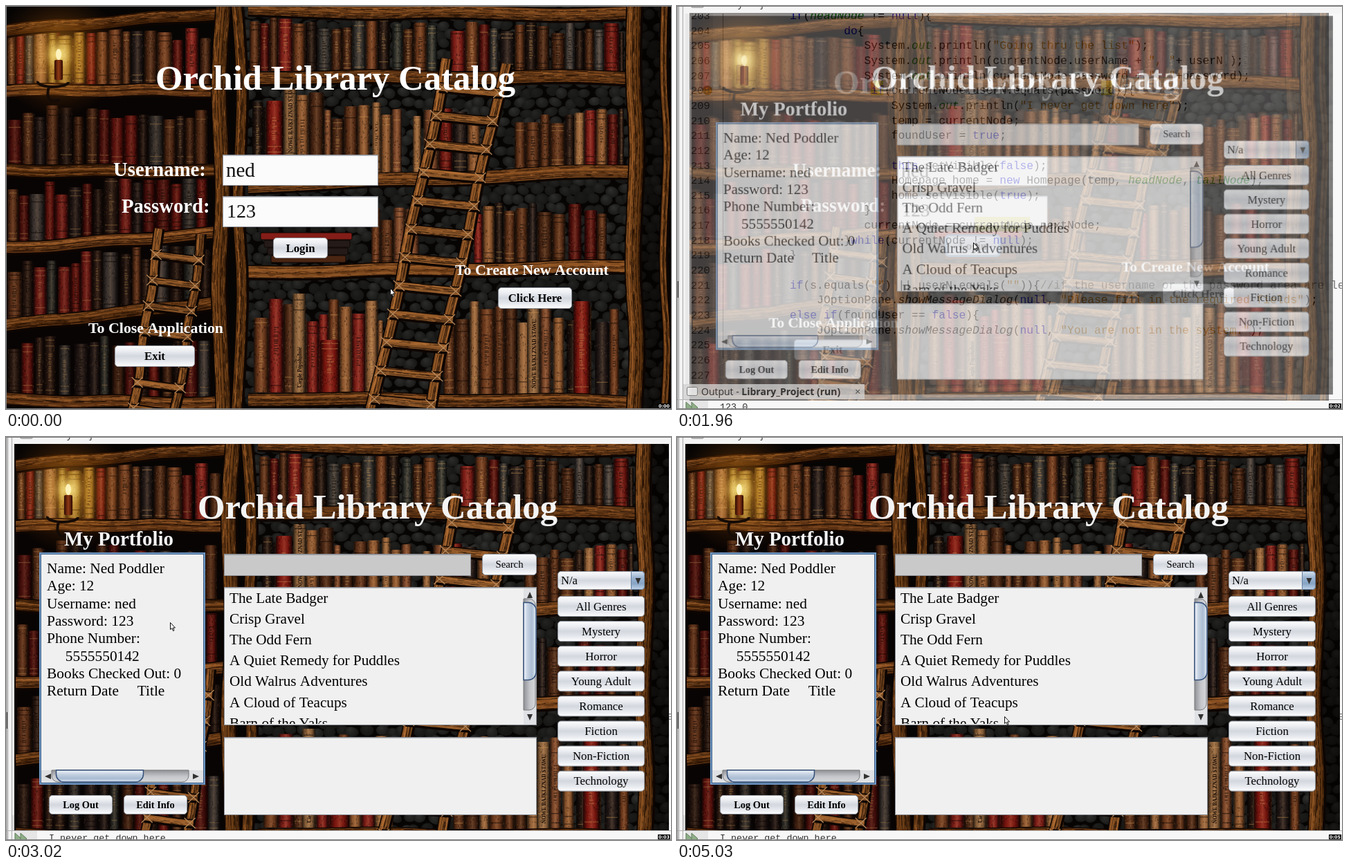
An HTML page with a canvas that plays this animation: 961x583 px, repeating every 5.13 s.

```html
<!DOCTYPE html>
<html lang="en">
<head>
<meta charset="utf-8">
<title>Library catalog</title>
<style>
html, body { margin: 0; width: 100%; height: 100%; overflow: hidden; background: #111; }
canvas { display: block; }
</style>
</head>
<body>
<canvas id="stage" width="961" height="583"></canvas>
<script>
const W = 961, H = 583, LOOP = 5130;
const SERIF = '"Liberation Serif", "Times New Roman", serif';
const MONO = '"Liberation Mono", monospace';
const SANS = '"Open Sans", sans-serif';
const stage = document.getElementById('stage').getContext('2d');
let g = stage;

let seed = 41;
function rnd() {
  seed = (seed + 0x6D2B79F5) | 0;
  let t = Math.imul(seed ^ (seed >>> 15), 1 | seed);
  t = (t + Math.imul(t ^ (t >>> 7), 61 | t)) ^ t;
  return ((t ^ (t >>> 14)) >>> 0) / 4294967296;
}
const range = (a, b) => a + rnd() * (b - a);
const pick = list => list[Math.floor(rnd() * list.length)];
const lerp = (a, b, f) => a + (b - a) * f;

function layer(draw) {
  const c = document.createElement('canvas');
  c.width = W; c.height = H;
  g = c.getContext('2d');
  draw();
  g = stage;
  return c;
}

function rect(x, y, w, h, fill) { g.fillStyle = fill; g.fillRect(x, y, w, h); }

function text(s, x, y, size, color = '#000', style = '', align = 'left', family = SERIF) {
  g.font = `${style} ${size}px ${family}`;
  g.textAlign = align;
  g.fillStyle = color;
  g.fillText(s, x, y);
}

function poly(points, fill, line) {
  g.beginPath();
  points.forEach(([x, y]) => g.lineTo(x, y));
  g.closePath();
  g.fillStyle = fill;
  g.fill();
  if (line) { g.strokeStyle = line; g.lineWidth = 1; g.stroke(); }
}

function blend(x0, y0, x1, y1, colors) {
  const gr = g.createLinearGradient(x0, y0, x1, y1);
  colors.forEach((c, i) => gr.addColorStop(i / (colors.length - 1), c));
  return gr;
}

function rounded(x, y, w, h, r, fill, line, lw = 1) {
  g.beginPath();
  g.roundRect(x, y, w, h, r);
  g.fillStyle = fill;
  g.fill();
  if (line) { g.strokeStyle = line; g.lineWidth = lw; g.stroke(); }
}

/* ---------- wallpaper ---------- */

const INK = {
  r: ['#74150f', '#841d17', '#58100c'], b: ['#5e3017', '#4a2512', '#713a1c'],
  t: ['#93592f', '#82492a', '#9d673b'], g: ['#3b3733', '#47403c', '#343630'],
  k: ['#20130e', '#2c1a12', '#241a18'], o: ['#9c661f', '#8d6422']
};

function book(x, w, top, bottom, color) {
  const h = bottom - top;
  rounded(x, top, w, h, [3, 3, 0, 0], color);
  g.fillStyle = blend(x, 0, x + w, 0,
    ['rgba(0,0,0,.75)', 'rgba(0,0,0,.1)', 'rgba(255,205,150,.16)', 'rgba(0,0,0,.15)', 'rgba(0,0,0,.85)']);
  g.fill();
  const gold = rnd() < .5 ? 'rgba(215,165,90,.36)' : 'rgba(10,4,0,.55)';
  for (const f of [.06, .16, .82, .92]) if (rnd() < .6) rect(x + 2, top + h * f, w - 4, 1.3, gold);
  if (rnd() < .5) {
    const end = top + h * range(.55, .78);
    for (let y = top + h * .3; y < end; y += range(2, 5)) rect(x + w * .35, y, w * range(.15, .35), 1.4, gold);
  }
  for (let i = 0; i < w * h / 20; i++)
    rect(x + rnd() * w, top + rnd() * h, 1, range(1, 3), rnd() < .6 ? 'rgba(0,0,0,.4)' : 'rgba(230,165,110,.16)');
}

// books standing on a floor that may slope
function row(x0, x1, floor, tall, mix) {
  for (let x = x0; x < x1 - 6;) {
    const w = Math.min(range(12, 22), x1 - x), y = floor(x);
    book(x, w, y - tall * range(.74, 1), y, pick(INK[pick(mix)]));
    x += w + (rnd() < .15 ? range(2, 6) : .5);
  }
}

function titled(label, x, w, top, bottom, color) {
  book(x, w, top, bottom, color);
  g.save();
  g.translate(x + w / 2 + 3, bottom - 8);
  g.rotate(-Math.PI / 2);
  text(label, 0, 0, 7.5, '#1b0d06', 'bold');
  g.restore();
}

function curve(points, dx, dy) {
  g.beginPath();
  g.moveTo(points[0][0] + dx, points[0][1] + dy);
  for (let i = 1; i < points.length; i++) {
    const [x, y] = points[i], [nx, ny] = points[i + 1] || points[i];
    g.quadraticCurveTo(x + dx, y + dy, (x + nx) / 2 + dx, (y + ny) / 2 + dy);
  }
}

function beam(points, w, base) {
  const a = points[0], b = points[points.length - 1];
  const upright = Math.abs(b[1] - a[1]) > Math.abs(b[0] - a[0]);
  const line = (color, lw, o) => {
    curve(points, upright ? o : 0, upright ? 0 : o);
    g.strokeStyle = color; g.lineWidth = lw; g.stroke();
  };
  line('#0d0502', w + 5, 1);
  line(base, w, 0);
  line('rgba(176,104,46,.45)', w * .3, -w * .25);
  for (let i = 0; i < w * 1.3; i++) {
    g.setLineDash([range(4, 40), range(4, 30)]);
    g.lineDashOffset = range(0, 60);
    line(rnd() < .58 ? 'rgba(20,8,2,.5)' : 'rgba(205,130,66,.32)', 1, range(-w / 2, w / 2));
  }
  g.setLineDash([]);
}

function wavy(x0, y0, x1, y1, dx, dy) {
  return Array.from({ length: 7 }, (_, i) => {
    const s = Math.sin(i * 2.1 + x0 + y0);
    return [lerp(x0, x1, i / 6) + dx * s, lerp(y0, y1, i / 6) + dy * s];
  });
}

// rails lean by `lean` pixels from top to bottom
function ladder(x, y, span, lean, gap, w) {
  const at = py => x + lean * (py - y) / (H - y);
  beam(wavy(x, y, at(H), H, 3, 0), w, '#7c4a20');
  beam(wavy(x + span, y + 8, at(H) + span, H, 3, 0), w, '#7c4a20');
  for (let ry = y + gap; ry < H; ry += gap) {
    const a = at(ry), b = a + span;
    beam([[a - 4, ry], [(a + b) / 2, ry + 5], [b + 5, ry + 9]], w * .8, '#855226');
    g.strokeStyle = '#b5875a';
    g.lineWidth = 1.3;
    g.beginPath();
    for (const [kx, ky] of [[a, ry], [b, ry + 8]]) {
      g.moveTo(kx - 8, ky - 7); g.lineTo(kx + 8, ky + 8);
      g.moveTo(kx + 8, ky - 7); g.lineTo(kx - 8, ky + 8);
    }
    g.stroke();
  }
}

function stones(x0, x1) {
  for (let y = 0; y < H + 10; y += 14) for (let x = x0; x < x1; x += 18) {
    const cx = x + range(-5, 5) + (y / 14 % 2) * 9, cy = y + range(-3, 3), s = Math.round(range(26, 46));
    const gr = g.createRadialGradient(cx - 2, cy - 3, 1, cx, cy, 11);
    gr.addColorStop(0, `rgb(${s},${s},${s - 2})`);
    gr.addColorStop(1, '#141413');
    g.fillStyle = gr;
    g.beginPath();
    g.ellipse(cx, cy, range(8, 11), range(6, 8.5), range(-.5, .5), 0, 7);
    g.fill();
  }
}

function candle(x, y) {
  const glow = g.createRadialGradient(x, y, 2, x, y, 90);
  ['rgba(255,225,120,.95)', 'rgba(215,130,25,.45)', 'rgba(170,85,10,.22)', 'rgba(120,50,0,0)']
    .forEach((c, i) => glow.addColorStop((i / 3) ** 1.3, c));
  g.globalCompositeOperation = 'screen';
  rect(0, 0, 180, 175, glow);
  g.globalCompositeOperation = 'source-over';
  g.strokeStyle = '#150b06';
  g.lineWidth = 4;
  g.beginPath();
  g.ellipse(x - 8, y + 40, 22, 7, 0, 0, 3.3);
  g.moveTo(x - 14, y + 46);
  g.quadraticCurveTo(x - 21, y + 73, x + 2, y + 66);
  g.stroke();
  rounded(x - 6, y + 8, 12, 29, 2, blend(x - 6, 0, x + 6, 0, ['#2c0a03', '#8f3a14', '#2c0a03']));
  g.fillStyle = '#fff3bd';
  g.beginPath();
  g.ellipse(x, y, 4, 8, 0, 0, 7);
  g.fill();
}

// shelf heights at the two ends of each bay
const LEFT = [[34, 10], [122, 122], [238, 239], [351, 328], [462, 428], [570, 575]];
const RIGHT = [[6, 12], [103, 103], [260, 238], [385, 377], [568, 572]];
// groups of books per right-hand shelf: start, end, height
const GROUPS = [
  [[352, 626, 80], [642, 893, 72]],
  [[356, 470, 128], [470, 572, 108], [588, 690, 98], [735, 893, 84]],
  [[528, 600, 82], [676, 868, 88]],
  [[358, 545, 138], [632, 893, 134]]
];

function wallpaper() {
  rect(0, 0, W, H, '#070504');
  stones(345, 950);
  rect(905, 0, 56, H, 'rgba(5,2,0,.5)');

  for (const [a, b] of LEFT.slice(1)) row(2, 296, x => lerp(a, b, x / 300) - 9, 86, 'rrkkbbg');
  rect(0, 134, 300, 449, 'rgba(10,2,0,.2)');
  row(40, 118, () => 111, 86, 'oot');

  GROUPS.forEach((groups, i) => {
    const [a, b] = RIGHT[i + 1];
    const floor = x => lerp(a, b, (x - 350) / 550) - 9;
    for (const [x0, x1, tall] of groups) row(x0, x1, floor, tall, i ? 'ttbbrk' : 'gkbbr');
  });
  for (let i = 0; i < 4; i++) rounded(368 + i * 5, 328 + i * 11, 132 - i * 8, 10, 2, pick(INK[pick('krbt')]), '#100703');
  const red = '#84160f', tan = '#95683f';
  book(376, 24, 137, 217, red);
  book(454, 28, 483, 559, red);
  book(820, 24, 427, 561, red);
  titled('NOWE BAJKI ZNAD STAWU', 401, 19, 120, 220, tan);
  titled('NOWE BAJKI ZNAD STAWU', 753, 19, 435, 561, tan);
  titled('Ciepłe Popołudnie', 414, 19, 416, 560, tan);

  LEFT.forEach(([a, b], i) => beam(wavy(0, a, 312, b, 0, 2.5), 16, i % 2 ? '#5c3112' : '#482409'));
  for (const [a, b] of RIGHT) beam(wavy(350, a, 900, b, 0, 3), 17, '#653815');
  for (const [x, w] of [[310, 20], [338, 14], [908, 20], [952, 9]]) beam(wavy(x, 0, x, H, 5, 0), w, '#57300f');

  ladder(222, 322, 62, -38, 37, 11);
  ladder(639, 76, 82, -110, 41, 13);
  candle(76, 70);
}

/* ---------- widgets ---------- */

const PLAIN = ['#ffffff', '#eceef2', '#d3d7de', '#e6e9ee', '#ffffff'];
const HOVER = ['#ffffff', '#f4f6fa', '#e0e4ec', '#f0f3f8', '#ffffff'];
const DOWN = ['#c3c7d4', '#b0b6c6', '#a0a7b8', '#b8bfce', '#d2d8e4'];
const BLUE = ['#dbe6f2', '#9db5d0', '#86a3c4', '#c3d6ea'];
const TRACK = ['#8f9196', '#c4c6ca', '#d8dadd'];
const THUMB = ['#f2f6fb', '#c3d0e0', '#a9bbd2', '#e2ecf6'];

function button(label, x, y, w, h, size, style = '', tones = PLAIN, focus = false) {
  if (focus) rounded(x - 2, y - 1.5, w + 4, h + 3, 6, '#6d9fd0', '#34608f');
  rounded(x + .5, y + .5, w - 1, h - 1, 4.5, blend(0, y, 0, y + h, tones), focus ? '#3d4a63' : '#8d929b');
  text(label, x + w / 2, y + h / 2 + size * .33, size, '#000', style, 'center');
}

function field(x, y, w, h, fill) {
  rect(x, y, w, h, '#8e9198');
  rect(x + 1, y + 1, w - 2, h - 2, fill);
  rect(x + 1, y + 1, w - 2, 1, 'rgba(90,95,105,.4)');
}

function arrowhead(x, y, dx, dy) {
  poly([[x + dx * 5, y + dy * 5], [x - dx * 4 + dy * 4, y - dy * 4 + dx * 4],
    [x - dx * 4 - dy * 4, y - dy * 4 - dx * 4]], '#333');
}

const TITLE = 'Orchid Library Catalog';

function login(tones, focus) {
  const label = (s, x, y, size) => text(s, x, y, size, '#fff', 'bold');
  g.drawImage(wall, 0, 0);
  label(TITLE, 216, 121, 50.7);
  label('Username:', 155, 246, 28.7);
  label('Password:', 167, 299, 28.7);
  field(313, 215, 225, 45, '#fbfbfc');
  field(313, 275, 225, 45, '#fbfbfc');
  text('ned', 318, 247, 29, '#111');
  text('123', 319, 306, 28, '#111');
  button('Login', 386, 335, 79, 30, 16.8, 'bold', tones, focus);
  label('To Create New Account', 649, 389, 21.9);
  button('Click Here', 711, 407, 107, 31, 16.8, 'bold');
  label('To Close Application', 119, 473, 21.9);
  button('Exit', 157, 491, 116, 31, 16.8, 'bold');
}

const PROFILE = ['Name: Ned Poddler', 'Age: 12', 'Username: ned', 'Password: 123', 'Phone Number:',
  '     5555550142', 'Books Checked Out: 0', 'Return Date     Title'];
const BOOKS = ['The Late Badger', 'Crisp Gravel', 'The Odd Fern', 'A Quiet Remedy for Puddles',
  'Old Walrus Adventures', 'A Cloud of Teacups', 'Barn of the Yaks'];
const GENRES = ['All Genres', 'Mystery', 'Horror', 'Young Adult', 'Romance', 'Fiction', 'Non-Fiction', 'Technology'];

function clipped(x, y, w, h, draw) {
  g.save();
  g.beginPath();
  g.rect(x, y, w, h);
  g.clip();
  draw();
  g.restore();
}

function home() {
  rect(12, 10, 946, 559, '#120a05');
  clipped(12, 10, 946, 559, () => g.drawImage(wall, 14, 6));
  text(TITLE, 277, 118, 50.7, '#f4f4f4', 'bold');
  text('My Portfolio', 84, 157, 28.9, '#f4f4f4', 'bold');

  rect(48, 167, 240, 336, '#6f98c4');
  rect(50, 169, 236, 332, '#3f5f86');
  rect(51, 170, 234, 330, '#f0f0f0');
  PROFILE.forEach((s, i) => text(s, 59, 197 + i * 25.3, 21.4));
  rect(51, 482, 234, 18, '#dfe1e4');
  rounded(66, 482, 198, 17, [0, 0, 9, 9], blend(0, 482, 0, 500, TRACK), '#777');
  rounded(72.5, 482, 126, 17, [0, 0, 11, 11], blend(0, 482, 0, 500, THUMB), '#34507a', 1.5);
  arrowhead(61, 491, -1, 0);
  arrowhead(274, 491, 1, 0);
  button('Log Out', 62, 518, 92, 28, 14.4, 'bold');
  button('Edit Info', 170, 518, 92, 28, 14.4, 'bold');

  field(315, 169, 357, 32, '#c9c9c9');
  button('Search', 688, 169, 79, 31, 14.7);
  field(315, 217, 452, 200, '#f0f0f0');
  clipped(316, 218, 432, 197, () => BOOKS.forEach((s, i) => text(s, 323, 240 + i * 30.1, 21.2)));
  rect(748, 219, 18, 197, '#dfe1e4');
  rounded(748, 234, 17, 161, [0, 9, 9, 0], blend(748, 0, 766, 0, TRACK), '#777');
  rounded(748, 239.5, 18, 112, [0, 11, 11, 0], blend(748, 0, 766, 0, THUMB), '#34507a', 1.5);
  arrowhead(757, 229, 0, -1);
  arrowhead(757, 405, 0, 1);
  field(315, 434, 452, 113, '#f0f0f0');

  button('', 797, 194, 126, 27, 16);
  rounded(903.5, 194.5, 19, 26, [0, 4, 4, 0], blend(0, 194, 0, 221, BLUE), '#66809f');
  arrowhead(913.5, 208, 0, 1);
  text('N/a', 802, 213, 16.6);
  GENRES.forEach((s, i) => button(s, 797, 230 + i * 36.1, 126, 30, 16.8));
}

/* ---------- editor behind the windows ---------- */

// one entry per line from 203 on; leading spaces indent by half a character
const CODE = `if(headNode != null){
                do{
                      System.out.println("Going thru the list");
                      System.out.println(currentNode.userName + ", "+ userN );
                      System.out.println(currentNode.password + ", "+password);
                        if(currentNode.userN.equals(password)){
                              System.out.println("I never get down here");
                              temp = currentNode;
                              foundUser = true;

                              this.setVisible(false);
                              Homepage home = new Homepage(temp, headNode, tailNode);
                              home.setVisible(true);
                      }
                      currentNode = currentNode.nextNode;
                }while(currentNode != null);
}

if(s.equals("") || userN.equals("")){//if the username or the password area are left blank
        JOptionPane.showMessageDialog(null, "Please fill in the required fields");
else if(foundUser == false){
        JOptionPane.showMessageDialog(null, "You are not in the system.");`.split('\n');
const TOKEN = /"[^"]*"|\/\/.*|\w+|\W/g;

function tint(word) {
  if (word[0] === '"') return ['#b86a00', ''];
  if (word.startsWith('//')) return ['#777', ''];
  if (/^(if|do|null|true|false|this|new|while|else)$/.test(word)) return ['#0000d0', ''];
  if (/^(headNode|tailNode|out)$/.test(word)) return ['#007a00', 'italic'];
  return ['#000', word === 'showMessageDialog' ? 'italic' : ''];
}

function editor() {
  const lineY = i => 19 + i * 21.65, cell = 9.78;
  rect(0, 0, W, H, '#f8f8f8');
  rect(0, 0, 52, 547, '#e8e8e8');
  rect(66, 10, 1, 500, '#888');
  rect(280, 108, 18, 21, '#e8e04a');
  rect(613, 108, 16, 21, '#e8e04a');
  rect(430, 305, 80, 21, '#ece89a');
  rounded(38, 116, 12, 12, 5, '#d79a20', '#6d4b10');
  for (let i = 0; i < 25; i++) text(203 + i, 20, lineY(i), 15.5, '#444', '', 'left', MONO);
  CODE.forEach((src, i) => {
    const line = src.trimStart();
    let x = 163 + (src.length - line.length) * cell / 2;
    for (const word of line.match(TOKEN) || []) {
      const [color, style] = tint(word);
      text(word, x, lineY(i), 16.3, color, style, 'left', MONO);
      x += word.length * cell;
    }
  });
  rect(0, 0, W, 11, '#f4f4f4');
  rounded(20.5, -8, 18, 10, 2, '#eee', '#777');
  text('Library Project', 50, 1, 14, '#333', '', 'left', SANS);
  rect(0, 0, 12, H, '#f2f2f2');
  rect(2, 0, 1, H, '#8a8a8a');
  rect(8, 0, 1, H, '#a8a8a8');
  rect(0, 398, 2, 24, '#555');
  outputTab();
  rect(9, 570, W, 13, '#f7f7f7');
  rect(12, 570, 33, 13, '#e6e6e6');
  rect(0, 569, W, 1, '#b5b5b5');
  for (const x of [13, 21]) poly([[x, 573], [x + 9, 581], [x, 589]], '#8fae88', '#5f7d5a');
}

function outputTab() {
  rect(9, 547, 262, 22, '#d9d9d9');
  rounded(14.5, 551.5, 15, 12, 2, '#eee', '#666');
  text('Output - ', 35, 563, 14, '#111', '', 'left', SANS);
  const x = 35 + g.measureText('Output - ').width;
  text('Library_Project (run)', x, 563, 14, '#111', 'bold', 'left', SANS);
  text('×', 257, 563, 15, '#333', '', 'left', SANS);
}

const wall = layer(wallpaper);
const loginPlain = layer(() => login(PLAIN, false));
const loginHover = layer(() => login(HOVER, false));
const loginDown = layer(() => login(DOWN, true));
const homeView = layer(home);
const editorView = layer(editor);

/* ---------- timeline ---------- */

const REST = 507, BEAT = 132;
const HOVERED = 8, PRESSED = 10, SWAP = 12;

// beat, pointer x, pointer y
const PATH = [
  [0, 555, 408], [2, 534, 324], [3, 484, 308], [5, 450, 301], [8, 430, 331], [11, 425, 338], [12, 428, 342],
  [14, 428, 342], [16, 490, 341], [17, 359, 347], [20, 237, 268], [22, 191, 460], [24, 180, 479],
  [27, 180, 479], [29, 203, 369], [31, 198, 331], [32, 198, 331], [35, 473, 404]
];

function pointerAt(beat) {
  const i = PATH.findIndex(p => p[0] >= beat);
  if (i < 1) return PATH[i ? PATH.length - 1 : 0].slice(1);
  const [b0, x0, y0] = PATH[i - 1], [b1, x1, y1] = PATH[i];
  const f = (beat - b0) / (b1 - b0);
  return [Math.round(lerp(x0, x1, f)), Math.round(lerp(y0, y1, f))];
}

function pointer(x, y, caret) {
  g.save();
  g.translate(x, y);
  if (caret) {
    rect(0, 0, 7, 1, '#222');
    rect(3, 0, 1, 12, '#222');
    rect(0, 11, 7, 1, '#222');
  } else {
    poly([[.5, .5], [.5, 10.5], [2.8, 8.6], [4.5, 12.5], [6, 11.8], [4.4, 8], [7.5, 8]], '#fff', '#111');
  }
  g.restore();
}

function show(view, alpha, scale, dx, dy) {
  g.globalAlpha = alpha;
  g.drawImage(view, dx, dy, W * scale, H * scale);
  g.globalAlpha = 1;
}

function draw(time) {
  const beat = Math.max(0, Math.floor((time - REST) / BEAT) + 1);
  if (beat < SWAP) {
    g.drawImage(beat < HOVERED ? loginPlain : beat < PRESSED ? loginHover : loginDown, 0, 0);
  } else {
    g.drawImage(editorView, 0, 0);
    text(beat === SWAP ? '123.0' : 'I never get down here', 62, 584, 13.4, '#333', '', 'left', MONO);
    if (beat === SWAP) {
      show(loginDown, .45, .962, 18, 10);
      show(homeView, .53, .98, 9, 4.5);
      g.globalAlpha = .75;
      outputTab();
      g.globalAlpha = 1;
    } else if (beat === SWAP + 1) {
      show(homeView, .95, .998, 1, 0);
    } else {
      g.drawImage(homeView, 0, 0);
    }
  }
  const [x, y] = pointerAt(beat);
  pointer(x, y, beat >= 3 && beat < SWAP);
  rect(0, 0, W, 1, '#7d7d7d');
  rect(0, 0, 1, H, '#7d7d7d');
  rect(0, 582, W, 1, '#7d7d7d');
  rect(942, 575, 18, 7, '#000');
  const clock = Math.floor((REST + (beat - 1) * BEAT + 70) / 1000);
  text('0:0' + clock, 951, 581, 6.4, '#fff', 'bold', 'center', '"DejaVu Sans", sans-serif');
}

const start = performance.now();
function tick() {
  draw((performance.now() - start) % LOOP);
  requestAnimationFrame(tick);
}
tick();
</script>
</body>
</html>
```
